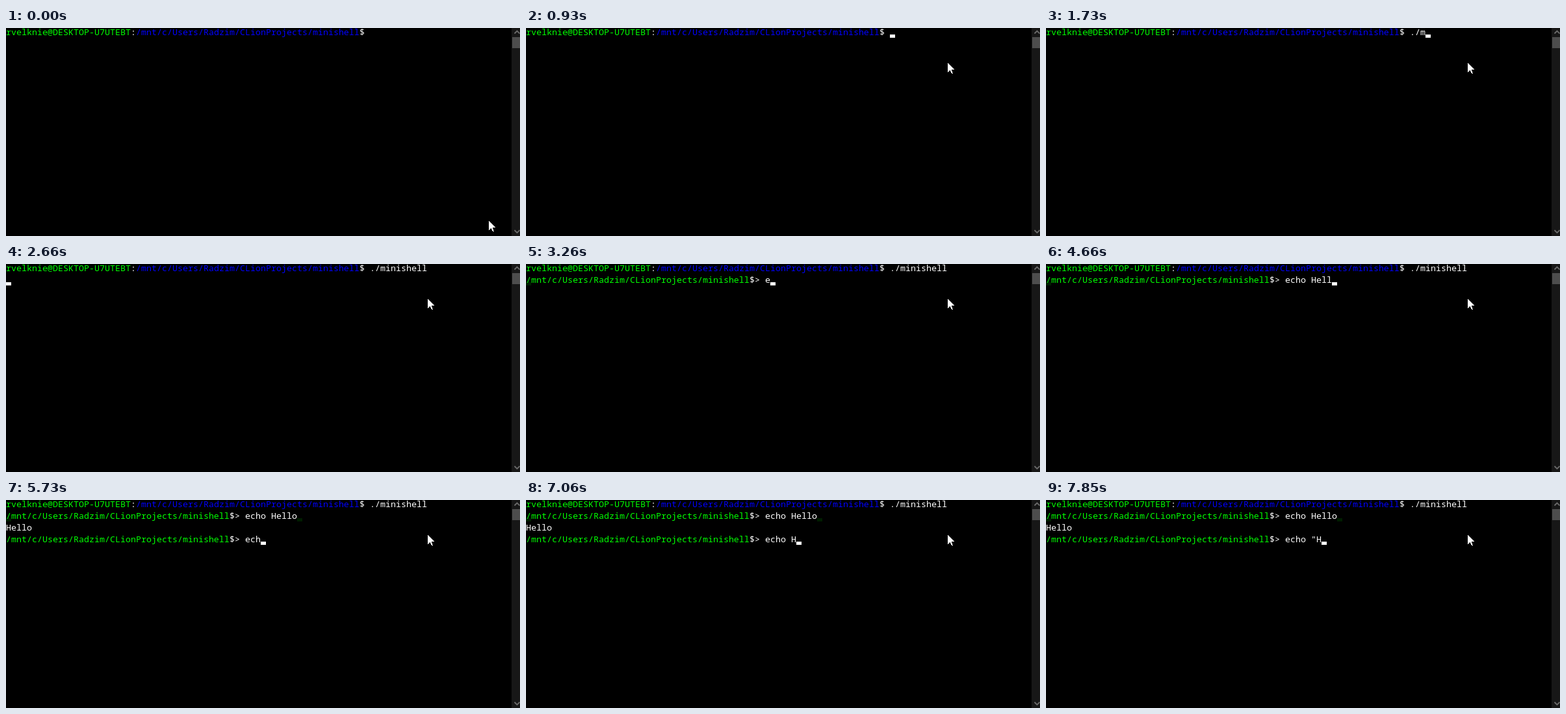
An HTML page that plays this animation: 791 by 320 pixels, repeating every 8 s.

```html
<!DOCTYPE html>
<html lang="en">
<head>
<meta charset="utf-8">
<title>minishell terminal</title>
<style>
  html, body { margin: 0; width: 100%; height: 100%; overflow: hidden; background: #000; }
  svg { display: block; width: 100%; height: 100%; }
  text {
    font: calc(40px / 3) "Noto Sans Mono", "DejaVu Sans Mono", monospace;
    font-variant-ligatures: none;
    white-space: pre;
    fill: #fff;
  }
  .green { fill: #00ff00; }
  .blue { fill: #0000ff; }
  .ghost { fill: #001e00; }
  .chevron { fill: none; stroke: #6a6a6a; stroke-width: 1.8; }
</style>
</head>
<body>
<svg viewBox="0 0 791 320">
  <rect width="791" height="320"/>
  <g id="ghosts"></g>
  <g id="rows"></g>
  <rect id="caret" width="8" height="5" fill="#fff"/>
  <g>
    <rect x="778" width="13" height="320" fill="#171717"/>
    <rect x="779" y="14" width="12" height="17" fill="#4d4d4d"/>
    <path class="chevron" d="M782.5 8.5 L786.5 4.5 L790.5 8.5"/>
    <path class="chevron" d="M782.5 311 L786.5 315 L790.5 311"/>
  </g>
  <path id="pointer" fill="#fff" shape-rendering="crispEdges"
        d="M0 -0.5 V14 L3.3 10.8 L6 16 H8 L5.5 10 H10.5 Z"/>
</svg>
<script>
const LOOP = 8000, CHAR = 8, LINE = 18, BASE = 11, CARET_Y = 10;
const PATH = '/mnt/c/Users/Radzim/CLionProjects/minishell';
const $ = id => document.getElementById(id);

function add(parent, tag, attrs, content = '') {
  const el = document.createElementNS('http://www.w3.org/2000/svg', tag);
  for (const name in attrs) el.setAttribute(name, attrs[name]);
  el.textContent = content;
  parent.append(el);
  return el;
}

// Each row: when it appears, its coloured parts, and the text typed after them.
const rows = [
  { at: 0, parts: [['rvelknie@DESKTOP-U7UTEBT', 'green'], [':', ''], [PATH, 'blue'], ['$ ', '']],
    typed: [[1260, '.'], [1460, './'], [1730, './m'], [2060, './minishell ']] },
  { at: 2730, parts: [[PATH, 'green'], ['$> ', '']],
    typed: [[3260, 'e'], [3330, 'ec'], [3530, 'ech'], [3600, 'echo'], [3800, 'echo '],
            [4260, 'echo H'], [4460, 'echo He'], [4600, 'echo Hel'], [4660, 'echo Hell'],
            [4860, 'echo Hello']] },
  { at: 4930, parts: [['Hello', '']], typed: [] },
  { at: 4930, parts: [[PATH, 'green'], ['$> ', '']],
    typed: [[5330, 'e'], [5530, 'ec'], [5730, 'ech'], [6200, 'echo'], [6330, 'echo '],
            [7060, 'echo H'], [7520, 'echo '], [7720, 'echo "'], [7850, 'echo "H']] }
];

// Caret visibility and row; it follows the text of that row.
const caretRows = [[0, -1], [930, 0], [2660, 1], [4930, 3]];
const pointerStops = [[0, [743, 297]], [70, [692, 160]], [130, [650, 55]],
                      [400, [637, 41]], [470, [649, 54]]];
// Faint marks the caret leaves behind.
const ghosts = [[2730, 0, 1], [4930, 56, 1]].map(([at, col, row]) => ({
  at, el: add($('ghosts'), 'rect', {
    class: 'ghost', x: col * CHAR, y: row * LINE + CARET_Y, width: CHAR, height: 5 })
}));

rows.forEach((row, i) => {
  row.el = add($('rows'), 'g', {});
  let col = 0;
  for (const [str, cls] of row.parts) {
    add(row.el, 'text', { x: col * CHAR, y: i * LINE + BASE, class: cls }, str);
    col += str.length;
  }
  row.col = col;
  row.input = add(row.el, 'text', { x: col * CHAR, y: i * LINE + BASE });
});

function latest(steps, t, fallback) {
  let value = fallback;
  for (const [at, v] of steps) if (t >= at) value = v;
  return value;
}

const show = (el, on) => el.setAttribute('visibility', on ? 'visible' : 'hidden');

function render(t) {
  for (const row of rows) {
    show(row.el, t >= row.at);
    row.input.textContent = latest(row.typed, t, '');
  }
  for (const g of ghosts) show(g.el, t >= g.at);

  const r = latest(caretRows, t, -1);
  show($('caret'), r >= 0);
  if (r >= 0) {
    const row = rows[r];
    const col = t >= row.at ? row.col + row.input.textContent.length : 0;
    $('caret').setAttribute('x', col * CHAR);
    $('caret').setAttribute('y', r * LINE + CARET_Y);
  }
  $('pointer').setAttribute('transform', `translate(${latest(pointerStops, t)})`);
}

let start;
function tick(now) {
  start ??= now;
  render(Math.max(0, now - start) % LOOP);
  requestAnimationFrame(tick);
}
render(0);
requestAnimationFrame(tick);
</script>
</body>
</html>
```
